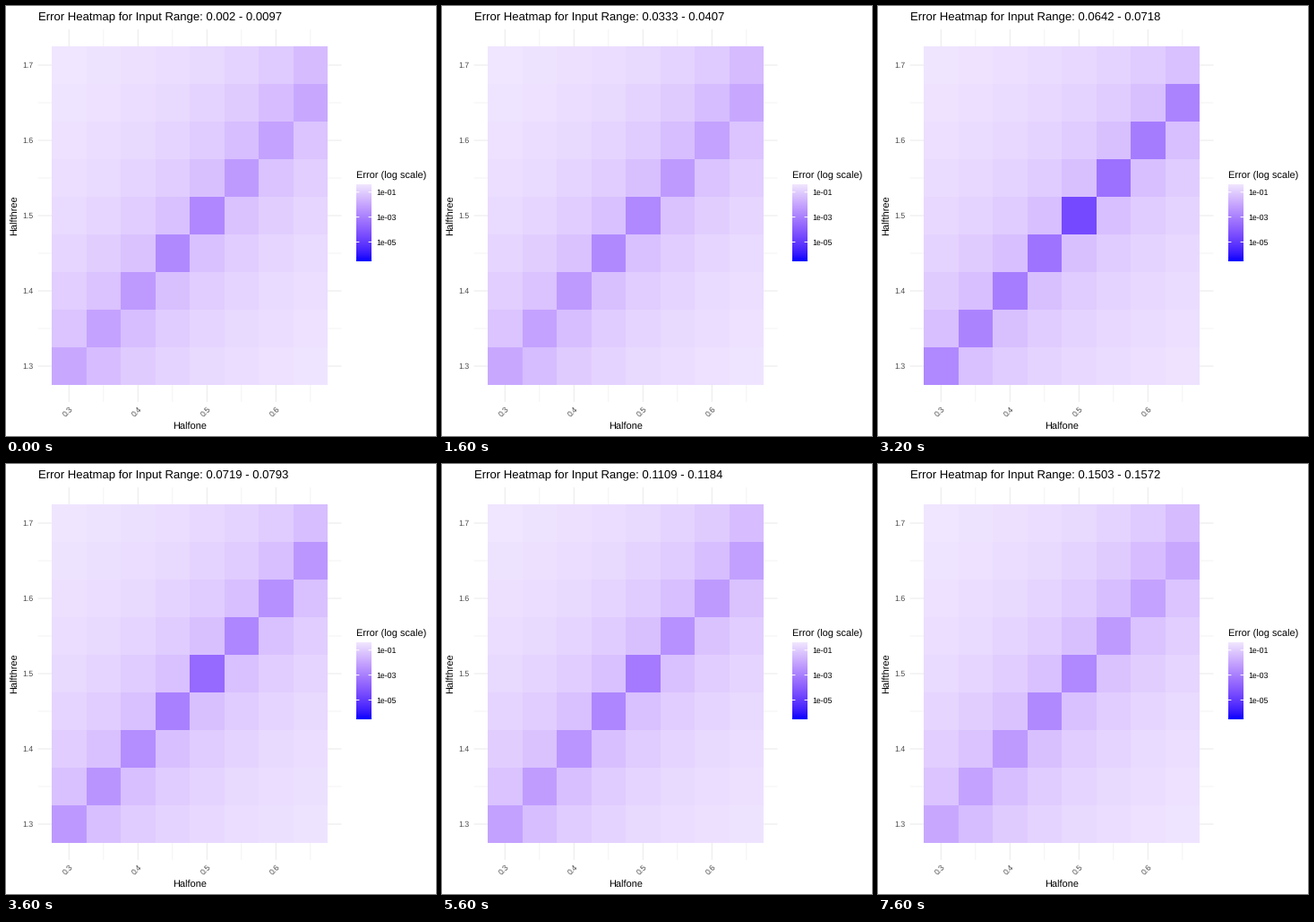
Write a matplotlib script that moves like this. It is 480 px wide and 480 px high and loops after 8 s.

```python
import numpy as np
import matplotlib.pyplot as plt
from matplotlib.animation import FuncAnimation
from matplotlib.patches import Rectangle

plt.rcParams["font.family"] = "Liberation Sans"
plt.rcParams["text.hinting"] = "none"

SIZE, DPI = 480, 72
# Smallest and largest sampled input of each bin, in units of 1e-4
LOW = [20, 98, 176, 254, 333, 409, 487, 563, 642, 719,
       798, 876, 955, 1032, 1109, 1187, 1263, 1342, 1420, 1503]
HIGH = [97, 173, 251, 329, 407, 484, 562, 641, 718, 793,
        873, 951, 1029, 1106, 1184, 1262, 1339, 1417, 1494, 1572]
TICK_MS = 100
BIN_AT = np.repeat(np.arange(20), [4] * 17 + [3, 5, 4])

HALF_ONE = np.linspace(0.30, 0.65, 8)
HALF_THREE = np.linspace(1.30, 1.70, 9)
LOG_MIN, LOG_MAX = -6.55, -0.37
RAMP_POWER = 1.25
BAR_X, BAR_TOP, BAR_W, BAR_H = 391, 199, 17, 86

RGB_TO_XYZ = np.array([[0.4124, 0.3576, 0.1805],
                       [0.2126, 0.7152, 0.0722],
                       [0.0193, 0.1192, 0.9505]])
WHITE = RGB_TO_XYZ.sum(axis=1)


def rgb_to_lab(rgb):
    rgb = np.asarray(rgb, float)
    linear = np.where(rgb > 0.04045, ((rgb + 0.055) / 1.055) ** 2.4, rgb / 12.92)
    xyz = RGB_TO_XYZ @ linear / WHITE
    fx, fy, fz = np.where(xyz > 0.008856, np.cbrt(xyz), 7.787 * xyz + 16 / 116)
    return np.array([116 * fy - 16, 500 * (fx - fy), 200 * (fy - fz)])


def lab_to_rgb(lab):
    fy = (lab[..., 0] + 16) / 116
    f = np.stack([fy + lab[..., 1] / 500, fy, fy - lab[..., 2] / 200], axis=-1)
    xyz = np.where(f > 0.2069, f ** 3, (f - 16 / 116) / 7.787) * WHITE
    linear = np.clip(xyz @ np.linalg.inv(RGB_TO_XYZ).T, 0, 1)
    rgb = np.where(linear > 0.0031308, 1.055 * linear ** (1 / 2.4) - 0.055, 12.92 * linear)
    return np.clip(rgb, 0, 1)


LAB_LOW = rgb_to_lab([0, 0, 1])
LAB_HIGH = rgb_to_lab([240 / 255, 230 / 255, 1])


def ramp(t):
    t = np.clip(np.asarray(t, float), 0, 1)[..., None] ** RAMP_POWER
    return lab_to_rgb(LAB_LOW + t * (LAB_HIGH - LAB_LOW))


def relative_error(value):
    """Relative error of the fast inverse square root, per parameter pair."""
    x = np.array([value], np.float32)
    guess = (np.int32(0x5F3759DF) - (x.view(np.int32) >> 1)).view(np.float32)
    x, guess = float(x[0]), float(guess[0])
    refined = guess * (HALF_THREE[:, None] - HALF_ONE * x * guess ** 2)
    return np.abs(refined * np.sqrt(x) - 1)


def px(half_one):
    return 51.1 + (half_one - 0.275) * 770


def py(half_three):
    return 423 - (half_three - 1.275) * 840


fig = plt.figure(figsize=(SIZE / DPI, SIZE / DPI), dpi=DPI, facecolor="white")
ax = fig.add_axes([0, 0, 1, 1])
ax.axis("off")


def label(x, y, text, size, color="black", **kwargs):
    return ax.text(x, y, text, fontsize=size, color=color, **kwargs)


def grid(xs, ys, width):
    style = dict(color="#EBEBEB", lw=width, zorder=1, capstyle="butt", snap=False)
    ax.vlines(px(xs), 26.1, 441.9, **style)
    ax.hlines(py(ys), 35.7, 374.5, **style)


major_x, major_y = np.arange(3, 7) / 10, np.arange(13, 18) / 10
grid(major_x, major_y, 1.07)
grid(major_x + 0.05, major_y[:-1] + 0.05, 0.53)

for v in major_x:
    label(px(v) - 0.9, 453.4, f"{v:.1f}", 8.8, "#4D4D4D",
          rotation=45, ha="center", va="center")
for v in major_y:
    label(31, py(v) + 3.3, f"{v:.1f}", 8.8, "#4D4D4D", ha="right")

label(205, 473, "Halfone", 11, ha="center")
label(13.3, 234, "Halfthree", 11, ha="center", va="baseline",
      rotation=90, rotation_mode="anchor")
title = label(35.7, 16, "", 13.14)

# Tiles
tiles = {}
for r, h3 in enumerate(HALF_THREE):
    for c, h1 in enumerate(HALF_ONE):
        x0, x1 = round(px(h1 - 0.025)), round(px(h1 + 0.025))
        y0, y1 = round(py(h3 + 0.025)), round(py(h3 - 0.025))
        tiles[r, c] = ax.add_patch(Rectangle((x0, y0), x1 - x0, y1 - y0, lw=0,
                                             antialiased=False, zorder=2))

# Legend
label(BAR_X - 0.3, 193, "Error (log scale)", 11)
ax.imshow(ramp(np.linspace(1, 0, BAR_H))[:, None, :], aspect="auto", zorder=2,
          interpolation="nearest",
          extent=(BAR_X, BAR_X + BAR_W, BAR_TOP + BAR_H, BAR_TOP))
for power in (-1, -3, -5):
    y = BAR_TOP + (LOG_MAX - power) / (LOG_MAX - LOG_MIN) * BAR_H
    label(413.8, y + 3, f"1e-0{-power}", 8.8)
    ax.hlines([y, y], [BAR_X, BAR_X + BAR_W * 0.8],
              [BAR_X + BAR_W * 0.2, BAR_X + BAR_W],
              color="white", lw=1, zorder=3, capstyle="butt", snap=False)
ax.set_xlim(0, SIZE)
ax.set_ylim(SIZE, 0)


def update(frame):
    k = BIN_AT[frame]
    low, high = LOW[k] / 1e4, HIGH[k] / 1e4
    title.set_text(f"Error Heatmap for Input Range: {low:g} - {high:g}")
    # Samples are drawn over each other, so the largest input stays on top
    level = (np.log10(relative_error(high)) - LOG_MIN) / (LOG_MAX - LOG_MIN)
    colors = ramp(level)
    for cell, tile in tiles.items():
        tile.set_facecolor(colors[cell])
    return [title, *tiles.values()]


anim = FuncAnimation(fig, update, frames=len(BIN_AT), interval=TICK_MS,
                     repeat=True, repeat_delay=0, blit=False)
plt.show()
```
